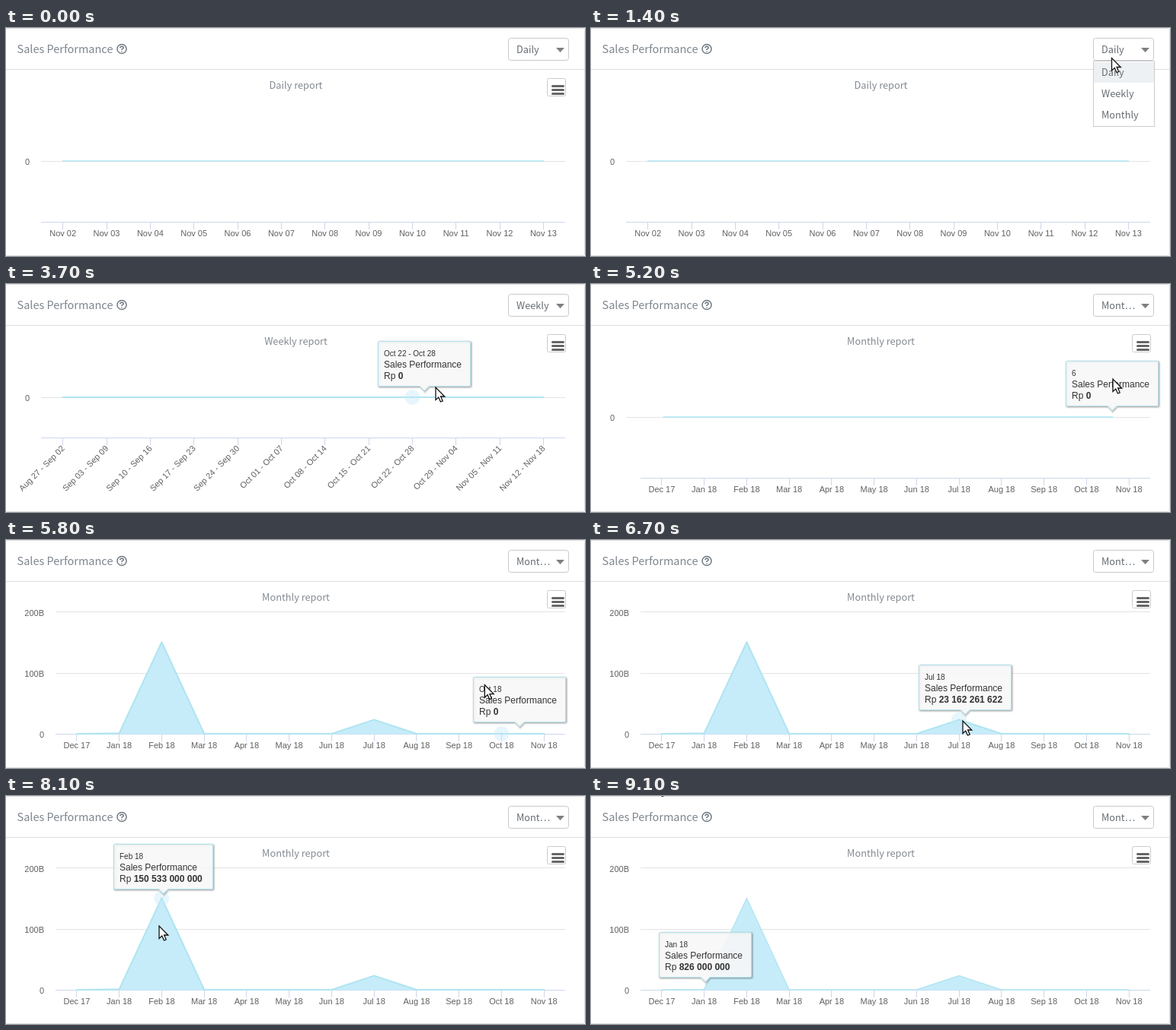
Animation of 760x300 px, one loop 9.2 s. Source, as an HTML page:

```html
<!DOCTYPE html>
<html lang="en">
<head>
<meta charset="utf-8">
<title>Sales Performance</title>
<style>
html, body { margin: 0; width: 100%; height: 100%; overflow: hidden; background: #fff; }
svg { display: block; width: 760px; height: 300px; }
.ui { font-family: "Noto Sans CJK JP", "Noto Sans", sans-serif; font-size: 12.75px; }
.chart { font-family: "Liberation Sans", Arial, sans-serif; font-size: 11px; fill: #606060; }
.tip { font-family: "Liberation Sans", Arial, sans-serif; font-size: 12px; fill: #333; }
.head { font-size: 14.5px; fill: #7d858e; }
.line { fill: none; stroke: #b0e5f1; stroke-linejoin: round; stroke-linecap: round; }
</style>
</head>
<body>
<svg viewBox="0 0 760 300">
  <g fill="none" stroke="#dedede">
    <path d="M0 .5H756.5Q759.5 .5 759.5 3.5V296.5Q759.5 299.5 756.5 299.5H0"/>
    <path d="M0 54.5H759"/>
  </g>
  <text class="ui head" x="14.5" y="33">Sales Performance</text>
  <circle cx="152" cy="27.5" r="6" fill="none" stroke="#717a83" stroke-width="1.5"/>
  <path d="M149.8 26.2Q149.9 24.2 152 24.2Q154.2 24.3 154.2 26Q154.1 27.2 152 28V29M152 30.2V31.6" fill="none" stroke="#717a83" stroke-width="1.5"/>
  <g id="chart"></g>
  <rect x="710.5" y="66.5" width="24" height="23" rx="2" fill="#fff" stroke="#ccc"/>
  <path d="M717.5 76.5H731.5M717.5 81.5H731.5M717.5 86.5H731.5" stroke="#666" stroke-width="3" stroke-linecap="round"/>
  <rect x="659.5" y="13.5" width="79" height="29" rx="3" fill="#fff" stroke="#c9c9c9"/>
  <path d="M722 26H733L727.5 32Z" fill="#7c7f83"/>
  <g id="top"></g>
  <path id="cursor" d="M0 0V16.5L3.8 13L6.4 19L9.2 17.8L6.6 12H11.8Z" fill="#fff" stroke="#111" stroke-width="1.3"/>
</svg>
<script>
const LOOP = 9200, STEP = 100, RIGHT = 734;
const el = id => document.getElementById(id);
const lerp = (a, b, p) => a + (b - a) * p;
const clamp01 = v => Math.min(1, Math.max(0, v));
const sine = p => 0.5 - Math.cos(Math.PI * clamp01(p)) / 2;
const two = n => String(n).padStart(2, '0');
const range = (n, fn) => Array.from({ length: n }, (_, i) => fn(i));

const dayName = d => d.toLocaleString('en-US', { month: 'short' }) + ' ' + two(d.getDate());
const days = range(12, i => 'Nov ' + two(i + 2));
const weeks = range(12, i =>
  dayName(new Date(2018, 7, 27 + 7 * i)) + ' - ' + dayName(new Date(2018, 8, 2 + 7 * i)));
const months = 'Dec 17,Jan 18,Feb 18,Mar 18,Apr 18,May 18,Jun 18,Jul 18,Aug 18,Sep 18,Oct 18,Nov 18'.split(',');
const sales = { 1: 0.826, 2: 150.533, 7: 23.162 };   // billions

const bare = { left: 46, axis: 255.5, zero: 175.5, labels: range(7, String) };
const modes = [
  { ...bare, t: 0, pick: 'Daily', title: 'Daily', labels: days },
  { ...bare, t: 1900, pick: 'Weekly', title: 'Weekly' },
  { t: 2520, pick: 'Weekly', title: 'Weekly', left: 46, axis: 202.5, zero: 149.5, labels: weeks, tilt: true },
  { ...bare, t: 4200, pick: 'Mont…', title: 'Monthly' },
  { t: 5200, pick: 'Mont…', title: 'Monthly', left: 65, axis: 255.5, zero: 255.5, labels: months, scale: 0.8 }
];
const xAt = (m, i) => m.left + (RIGHT - m.left) / m.labels.length * (i + 0.5);
const yAt = (m, i) => m.zero - 0.5 - (m.scale ? (sales[i] || 0) * m.scale : 0);

// cursor path: time, x, y
const path = [
  [300, 417, 83], [500, 470, 45], [800, 600, 3], [1100, 682, 24], [1300, 682, 24], [1700, 688, 86],
  [1900, 688, 86], [2200, 684, 92], [2400, 660, 95], [3200, 660, 95], [3500, 548, 140], [3700, 564, 136],
  [4000, 686, 26], [4180, 688, 116], [4700, 690, 130], [5200, 685, 125], [5400, 685, 128],
  [6000, 600, 222], [6400, 500, 245], [6700, 488, 238], [7000, 488, 238], [7600, 216, 178],
  [8000, 201, 171], [8500, 201, 171], [9100, 87, -18.5]
];

// tooltip targets: time, mode, point, value; no mode hides it
const hops = [
  [2560, 2, 10, '0'], [3340, 2, 9, '0'], [3530, 2, 8, '0'], [3730, 2, 9, '0'], [3820, 2, 10, '0'], [3950],
  [4650, 3, 6, '0'], [5290, 4, 11, '0'], [5700, 4, 10, '0'], [5950, 4, 9, '0'], [6200, 4, 8, '0'],
  [6450, 4, 7, '23 162 261 622'], [7150, 4, 6, '0'], [7270, 4, 5, '0'], [7390, 4, 4, '0'],
  [7510, 4, 3, '0'], [7650, 4, 2, '150 533 000 000'], [8580, 4, 1, '826 000 000']
];

function cursorAt(t) {
  const i = path.findIndex(k => k[0] > t);
  if (i === 0) return null;
  if (i < 0) return path[path.length - 1].slice(1);
  const [a, b] = [path[i - 1], path[i]], p = (t - a[0]) / (b[0] - a[0]);
  return [lerp(a[1], b[1], p), lerp(a[2], b[2], p)];
}

function tipAt(t) {
  let pos = null;
  hops.forEach(([from, mode, i, value], k) => {
    if (from > t) return;
    if (mode === undefined) { pos = null; return; }
    const m = modes[mode], x = xAt(m, i), y = yAt(m, i);
    const until = Math.min(t, k + 1 < hops.length ? hops[k + 1][0] : LOOP);
    const p = pos ? 1 - Math.exp((from - until) / 110) : 1;
    pos = { cx: pos ? lerp(pos.cx, x + 0.5, p) : x + 0.5, cy: pos ? lerp(pos.cy, y, p) : y,
            x, y, value, head: m.labels[i], live: m !== modes[3] && t < 9050 };
  });
  return pos;
}

const text = (x, y, s, extra = '') => `<text x="${x}" y="${y}" ${extra}>${s}</text>`;
const grid = (x, y, o = 1) => `<path d="M${x} ${y}H${RIGHT}" stroke="#e3e3e3" opacity="${o}"/>`;

function drawChart(t, tip) {
  const k = modes.filter(m => m.t <= t).length - 1;
  const m = modes[k], old = modes[k - 1] || m, n = m.labels.length;
  const p = sine((t - m.t) / 500);
  const zero = lerp(old.zero, m.zero, p), left = lerp(old.left, m.left, p);
  let s = text(380.5, 80, m.title + ' report', 'class="ui" text-anchor="middle" fill="#838a92"');

  s += grid(left, zero);
  if (m.scale) s += grid(65, 175.5, p) + grid(65, 94.5, p);

  s += '<g class="chart">' + text(m.scale ? lerp(31, 50, p) : 31, zero + 4.3, '0', 'text-anchor="end"');
  if (m.scale) s += [['100B', 179.8], ['200B', 100.3]].map(([v, y]) =>
    text(50, y, v, `text-anchor="end" opacity="${p}"`)).join('');

  let ticks = `M${m.left} ${m.axis}H${RIGHT}`;
  m.labels.forEach((label, i) => {
    const x = xAt(m, i);
    ticks += `M${Math.floor(x) + 0.5} ${m.axis}v9.5`;
    s += m.tilt
      ? text(x + 3, 217, label, `text-anchor="end" transform="rotate(-45 ${x + 3} 217)"`)
      : text(x, 274, label, 'text-anchor="middle"');
  });
  s += `<path d="${ticks}" fill="none" stroke="#ccd6eb"/></g>`;

  const start = xAt(old, 0), end = xAt(old, old.labels.length - 1);
  const pts = range(n, i => [lerp(lerp(start, end, i / (n - 1)), xAt(m, i), p),
                             lerp(old.zero - 0.5, yAt(m, i), p)]);
  const d = 'M' + pts.map(q => q.map(v => v.toFixed(2)).join(' ')).join('L');
  if (m.scale) s += `<path d="${d}V${zero}H${pts[0][0]}Z" fill="#c5ebf9" fill-opacity=".95"/>`;
  const hot = tip && tip.live || t >= 2300 && t < 2560;
  s += `<path class="line" d="${d}" stroke-width="${hot ? 2.2 : 1.4}"/>`;
  if (tip && tip.live) s += `<circle cx="${tip.x}" cy="${tip.y}" r="10" fill="#c5e9f8" opacity=".42"/>
    <circle cx="${tip.x}" cy="${tip.y}" r="1" fill="#a5dcec"/>`;
  el('chart').innerHTML = s;
  return m;
}

function drawList(t) {
  const first = t >= 1300 && t < 1900, second = t >= 4000 && t < 4200;
  if (!first && !second) return '';
  const over = first ? (t < 1500 ? 0 : 1) : (t < 4100 ? 1 : 2);
  return `<rect x="659.5" y="43.5" width="80" height="86" fill="#fff" stroke="#ccc"/>
    <rect x="660" y="${45 + over * 28}" width="79" height="27" fill="#eef1f4"/>` +
    ['Daily', 'Weekly', 'Monthly'].map((s, i) => text(670, 63 + 28 * i, s, 'class="ui" fill="#666c73"')).join('');
}

function drawTip(tip) {
  if (!tip) return '';
  const w = tip.value.length > 14 ? 130 : 121, h = 59;
  const x = Math.min(tip.cx - w / 2, 623), y = tip.cy - 74, mid = w / 2;
  const d = `M2 0H${w - 2}Q${w} 0 ${w} 2V${h - 2}Q${w} ${h} ${w - 2} ${h}H${mid + 6}L${mid} ${h + 6}L${mid - 6} ${h}H2Q0 ${h} 0 ${h - 2}V2Q0 0 2 0Z`;
  const shade = [5, 3, 1].map((sw, i) =>
    `<path d="${d}" transform="translate(1 1)" fill="none" stroke="#000" stroke-opacity="${0.05 * (i + 1)}" stroke-width="${sw}"/>`).join('');
  return `<g class="tip" transform="translate(${Math.round(x) + 0.5} ${Math.round(y) + 0.5})">${shade}
    <path d="${d}" fill="#f7f7f7" fill-opacity=".87" stroke="#b0e3ef"/>` +
    text(7.5, 19.5, tip.head, 'font-size="10"') + text(7.5, 34.5, 'Sales Performance') +
    text(7.5, 49.5, `Rp <tspan font-weight="bold">${tip.value}</tspan>`) + '</g>';
}

function draw(t) {
  const tip = tipAt(t), m = drawChart(t, tip), at = cursorAt(t);
  el('top').innerHTML = text(670, 33, m.pick, 'class="ui" fill="#666c73"') + drawList(t) + drawTip(tip);
  el('cursor').setAttribute('visibility', at ? 'visible' : 'hidden');
  if (at) el('cursor').setAttribute('transform', `translate(${at[0]} ${at[1]})`);
}

let shown = -1;
const begin = performance.now();
function tick() {
  const t = Math.floor((performance.now() - begin) % LOOP / STEP) * STEP;
  if (t !== shown) draw(shown = t);
  requestAnimationFrame(tick);
}
tick();
</script>
</body>
</html>
```
